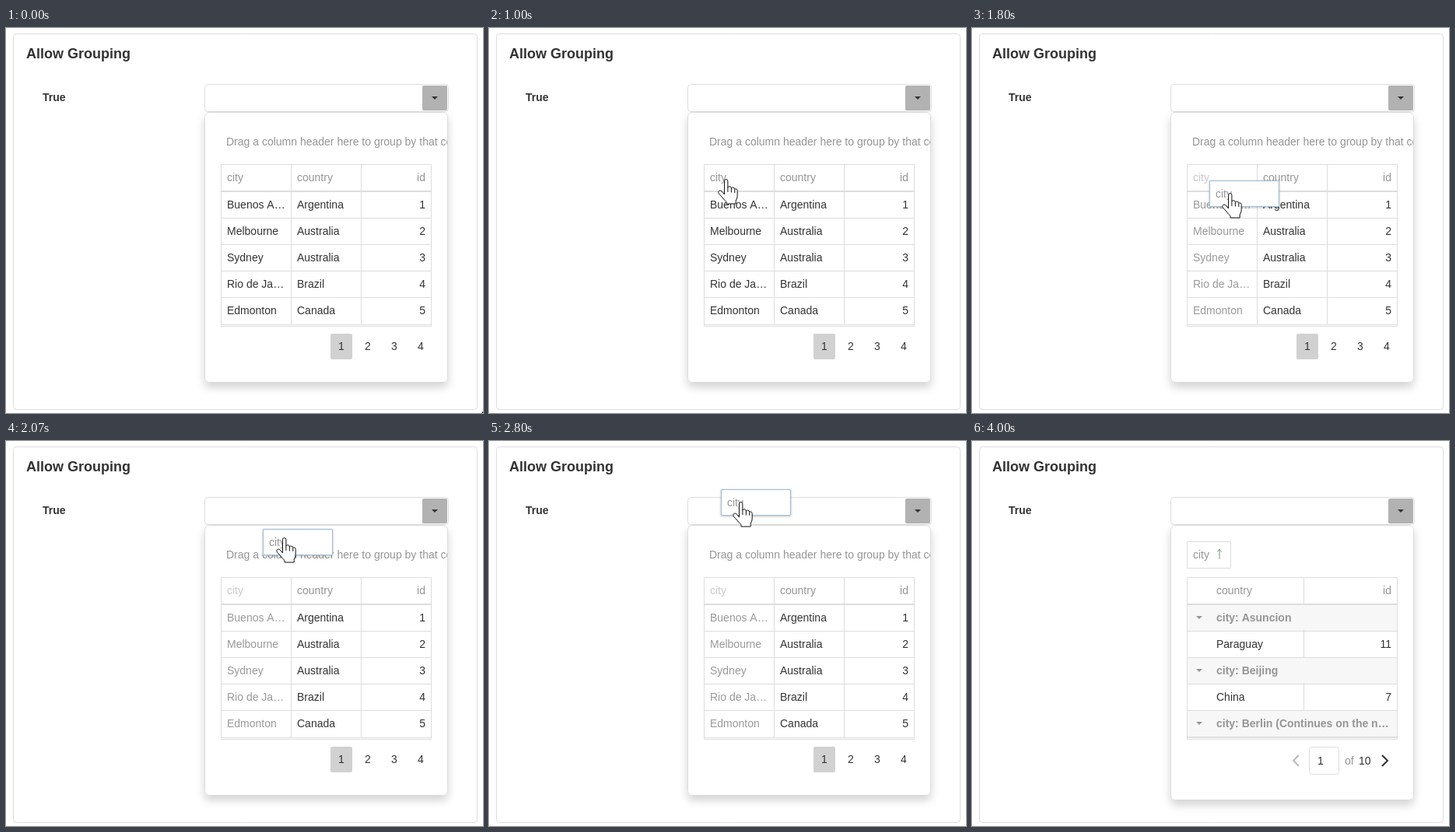
Animation, 613 px wide and 495 px high, one loop 4.94 s. Source, as an HTML page with a canvas:

```html
<!DOCTYPE html>
<html lang="en">
<head>
<meta charset="utf-8">
<title>Allow Grouping</title>
<style>
html, body { margin: 0; width: 100%; height: 100%; overflow: hidden; background: #fff; }
canvas { display: block; }
</style>
</head>
<body>
<canvas id="stage" width="613" height="495"></canvas>
<script>
const ctx = document.getElementById('stage').getContext('2d', { alpha: false });
const LOOP = 4940, STEPS_PER_MS = .015;
const LINE = '#ddd', DARK = '#333', GREY = '#959595';
const FONT = '"Liberation Sans", Arial, sans-serif';

const GRID = { x: 276, y: 175, w: 271, row: 34, count: 5 };
const rowTop = i => GRID.y + 36 + i * GRID.row;
const baseline = i => rowTop(i) + 21;

// Times in steps: drag begins, header is dropped, input lights up, mouse has left
const DRAG = 21, DROP = 45, HOVER = 50, GONE = 60;

// Turning points of the mouse: [step, x, y], eased in between
const mousePath = [
  [1, 612, 493], [7, 275, 256], [9, 315, 226], [16, 303, 192], [19, 303, 192], [22, 315, 215],
  [27, 331, 212], [31, 357, 124], [35, 344, 90], [42, 323, 78], [HOVER, 324, 78],
  [57, 272, 362], [59, 182, 474]
];

const handShape = new Path2D('M8.5 20V2.8a2.2 2.2 0 0 1 4.4 0V11q.5-1.3 2-1.3q2.3 0 2.5 2.4q.6-1 2-1q2.2 0 2.4 2.3' +
  'q.6-.6 1.4-.6q2 0 2 2.6V22q0 3-2 6v4H11v-2.5Q8 27 6 24L1.3 18.8q-1.4-2.2.5-3.4q1.8-1 3.7.8Z');
const handLines = new Path2D('M12.9 11v6M17.4 12v5.5M21.8 13.4v4.5');
const arrowShape = new Path2D('M.5 .5V25L6 19.5L9.8 27.6L13.6 26L10 17.8H17.6Z');

const ease = k => k * k * (3 - 2 * k);

function mouseAt(s) {
  const last = mousePath.length - 1;
  const i = Math.max(1, Math.min(last, mousePath.findIndex(p => p[0] >= s) >>> 0));
  const [s0, x0, y0] = mousePath[i - 1], [s1, x1, y1] = mousePath[i];
  const k = ease(Math.max(0, Math.min(1, (s - s0) / (s1 - s0))));
  return { x: Math.round(x0 + (x1 - x0) * k), y: Math.round(y0 + (y1 - y0) * k) };
}

// The dragged header trails the mouse a little
function chipAt(s) {
  const { x, y } = mouseAt(s - .6);
  return { x: x - 25, y: y - 16 };
}

function text(str, x, y, color = DARK, align = 'left', style = '14px') {
  ctx.font = `${style} ${FONT}`;
  ctx.fillStyle = color;
  ctx.textAlign = align;
  ctx.fillText(str, x, y);
}

function fill(x, y, w, h, color, r = 0) {
  ctx.fillStyle = color;
  ctx.beginPath();
  ctx.roundRect(x, y, w, h, r);
  ctx.fill();
}

function frame(x, y, w, h, r = 0, color = LINE) {
  ctx.strokeStyle = color;
  ctx.lineWidth = 1;
  ctx.beginPath();
  ctx.roundRect(x + .5, y + .5, w - 1, h - 1, r);
  ctx.stroke();
}

// Open angle with its tip at x, y and arms reaching dx, dy; mirrored across the given axis
function angle(x, y, dx, dy, vertical, color, width) {
  ctx.strokeStyle = color;
  ctx.lineWidth = width;
  ctx.beginPath();
  ctx.moveTo(x + dx, y + dy);
  ctx.lineTo(x, y);
  ctx.lineTo(x + (vertical ? -dx : dx), y + (vertical ? dy : -dy));
  ctx.stroke();
}

function caret(x, y, color) {
  ctx.fillStyle = color;
  ctx.beginPath();
  ctx.moveTo(x - 4, y - 2);
  ctx.lineTo(x + 4, y - 2);
  ctx.lineTo(x, y + 2);
  ctx.fill();
}

function withShadow(blur, dy, alpha, paint) {
  ctx.save();
  ctx.shadowColor = `rgba(0,0,0,${alpha})`;
  ctx.shadowBlur = blur;
  ctx.shadowOffsetY = dy;
  paint();
  ctx.restore();
}

const hLine = (y, h = 1) => fill(GRID.x, y, GRID.w, h, LINE);
const vLine = (x, y, h) => fill(x, y, 1, h, LINE);

function editor(hover) {
  frame(9, 7, 597, 484, 4);
  text('Allow Grouping', 26, 39, DARK, 'left', 'bold 18px');
  text('True', 47, 94, DARK, 'left', 'bold 14px');
  frame(255, 72, 314, 36, 4, hover ? '#adcae2' : LINE);
  fill(535, 74, 32, 32, hover ? '#e6e6e6' : '#b2b2b2', 2);
  caret(551, 90, DARK);
}

function popup(height) {
  withShadow(12, 6, .175, () => fill(255, 108, 313, height, '#fff', 6));
  frame(255, 108, 313, height, 6);
}

function gridLines() {
  frame(GRID.x, GRID.y, GRID.w, 209);
  hLine(rowTop(0) - 2, 2);
  for (let i = 1; i < GRID.count; i++) hLine(rowTop(i) - 1);
  hLine(rowTop(GRID.count));
}

function plainGrid(dragging) {
  popup(348);
  ctx.save();
  ctx.beginPath();
  ctx.rect(256, 109, 311, 346);
  ctx.clip();
  text('Drag a column header here to group by that column', 283, 151, GREY);
  ctx.restore();

  gridLines();
  vLine(366, GRID.y, 206);
  vLine(456, GRID.y, 206);
  text('city', 284, 197, dragging ? '#cacaca' : GREY);
  text('country', 374, 197, GREY);
  text('id', 539, 197, GREY, 'right');
  const cities = ['Buenos A…', 'Melbourne', 'Sydney', 'Rio de Ja…', 'Edmonton'];
  const countries = ['Argentina', 'Australia', 'Australia', 'Brazil', 'Canada'];
  for (let i = 0; i < GRID.count; i++) {
    text(cities[i], 284, baseline(i), dragging ? '#999' : DARK);
    text(countries[i], 374, baseline(i));
    text(i + 1, 539, baseline(i), DARK, 'right');
  }

  fill(417, 393, 28, 33, '#d1d1d1', 2);
  for (let p = 0; p < 4; p++) text(p + 1, 431 + p * 34, 414, DARK, 'center');
}

function groupedGrid() {
  popup(354);
  frame(276, 129, 57, 35);
  text('city', 284, 151, GREY);
  fill(317.5, 139, 1, 13, '#6d9a78');
  angle(318, 139, 2.5, 3.5, true, '#6d9a78', 1);

  const groups = ['Asuncion', 'Beijing', 'Berlin (Continues on the n…'];
  groups.forEach((name, i) => {
    const y = rowTop(i * 2);
    fill(GRID.x + 1, y, GRID.w - 2, GRID.row, '#f7f7f7');
    caret(292, y + 16, GREY);
    text(`city: ${name}`, 314, baseline(i * 2), GREY, 'left', 'bold 14px');
    vLine(426, y - 36, GRID.row + 1);
  });
  gridLines();
  hLine(rowTop(GRID.count) - 1);
  text('country', 314, 197, GREY);
  text('id', 539, 197, GREY, 'right');
  [['Paraguay', 11], ['China', 7]].forEach(([country, id], i) => {
    text(country, 314, baseline(i * 2 + 1));
    text(id, 539, baseline(i * 2 + 1), DARK, 'right');
  });

  angle(413, 411, 7, 7, false, '#bbb', 2);
  frame(433, 393, 39, 36, 4);
  text('1', 444, 416);
  text('of', 479, 416, GREY);
  text('10', 497, 416);
  angle(534, 411, -7, 7, false, DARK, 2);
}

function dragChip({ x, y }) {
  withShadow(3, 1, .25, () => fill(x, y, 90, 34, '#fff'));
  frame(x, y, 90, 34, 0, '#99bcdb');
  text('city', x + 8, y + 22, GREY);
}

function cursor({ x, y }, isHand) {
  const shape = isHand ? handShape : arrowShape;
  ctx.save();
  ctx.translate(isHand ? x - 10 : x, y);
  ctx.fillStyle = '#fff';
  ctx.strokeStyle = '#111';
  ctx.lineWidth = 1;
  ctx.lineJoin = isHand ? 'round' : 'miter';
  ctx.fill(shape);
  ctx.stroke(shape);
  if (isHand) ctx.stroke(handLines);
  ctx.restore();
}

function draw(ms) {
  const s = Math.floor(ms * STEPS_PER_MS + .08);
  const mouse = mouseAt(s);
  const grouped = s >= DROP;
  const dragging = s >= DRAG && !grouped;
  const overInput = grouped && mouse.y < 108;
  const overHeader = mouse.y < 210 && (mouse.y > GRID.y || !grouped);

  fill(0, 0, 613, 495, '#fff');
  editor(overInput && s >= HOVER);
  if (grouped) groupedGrid();
  else plainGrid(dragging);
  if (dragging) dragChip(chipAt(s));
  if (s < GONE) cursor(mouse, dragging || overInput || overHeader);
}

function tick() {
  draw(performance.now() % LOOP);
  requestAnimationFrame(tick);
}
tick();
</script>
</body>
</html>
```
